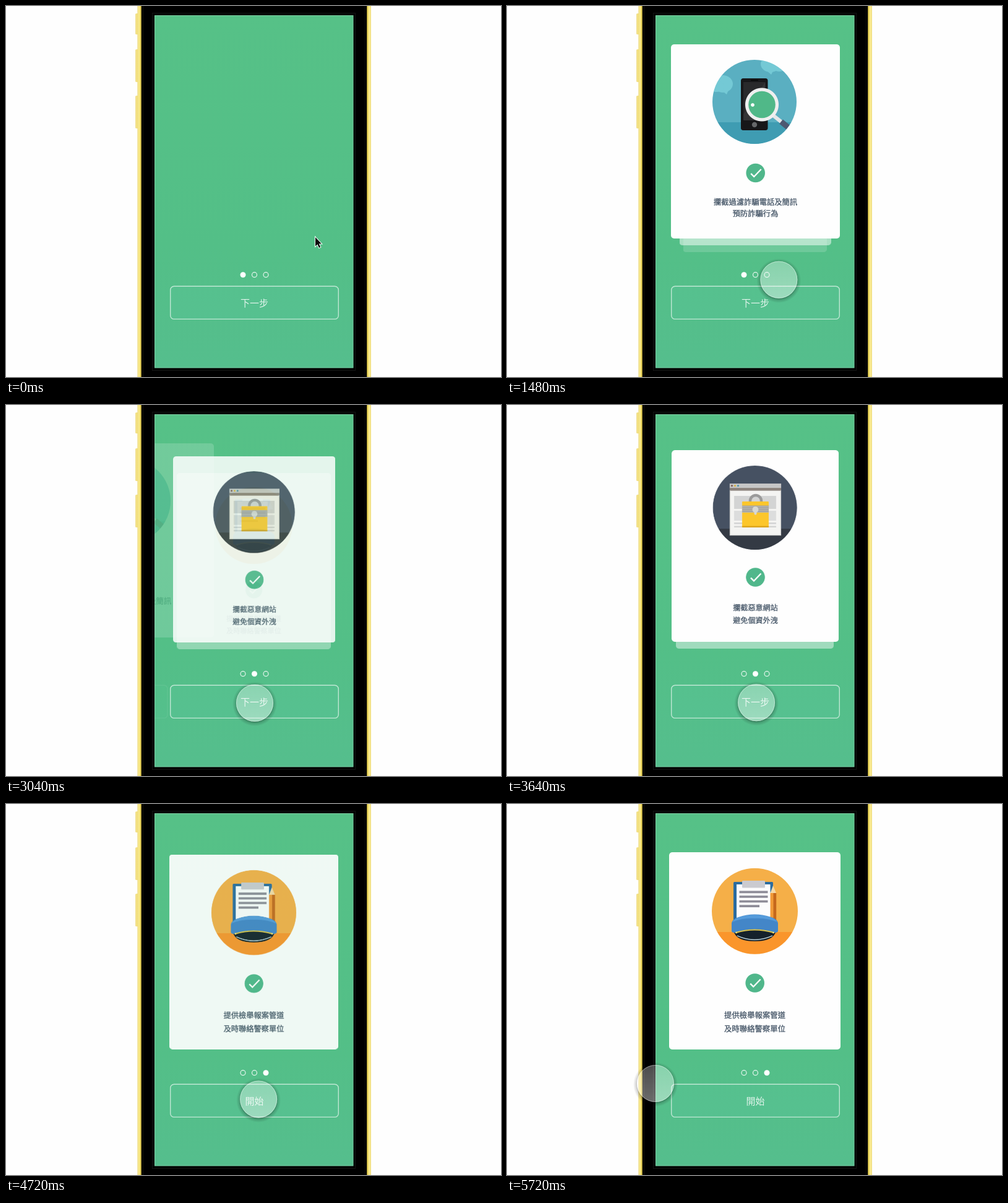
Animation of 800 by 600 pixels, one loop 5760 ms. Source, as an HTML page with a canvas:

```html
<!DOCTYPE html>
<html lang="zh-Hant">
<head>
<meta charset="utf-8">
<title>Onboarding cards</title>
<style>
html, body { margin: 0; width: 100%; height: 100%; overflow: hidden; background: #fefefe; }
canvas { display: block; width: 800px; height: 600px; }
</style>
</head>
<body>
<canvas id="stage" width="800" height="600"></canvas>
<script>
const LOOP = 5760;
const STEP_1 = 2885, STEP_2 = 4480;   // taps on the button
const TAU = 130;
const FONT = '"Noto Sans CJK TC", "Noto Sans CJK", "Noto Sans", sans-serif';
const main = document.getElementById('stage').getContext('2d');
let g = main;

const clamp = v => Math.max(0, Math.min(1, v));
const mix = (a, b, p) => a + (b - a) * p;
const settle = (t, start, tau) => t < start ? 0 : 1 - Math.exp((start - t) / tau);

function rect(x, y, w, h, fill, r = 0) {
  g.fillStyle = fill;
  g.beginPath();
  g.roundRect(x, y, w, h, r);
  g.fill();
}
function disc(x, y, r, fill, ry = r) {
  g.fillStyle = fill;
  g.beginPath();
  g.ellipse(x, y, r, ry, 0, 0, 7);
  g.fill();
}
function line(points, color, width, cap = 'butt') {
  g.strokeStyle = color;
  g.lineWidth = width;
  g.lineCap = cap;
  g.beginPath();
  points.forEach(([x, y], i) => i ? g.lineTo(x, y) : g.moveTo(x, y));
  g.stroke();
}
function shape(d, fill) {
  g.fillStyle = fill;
  g.fill(new Path2D(d));
}
function curve(d, color, width) {
  g.strokeStyle = color;
  g.lineWidth = width;
  g.lineCap = 'butt';
  g.stroke(new Path2D(d));
}
function label(text, x, y, size, fill, heavy) {
  g.font = `${size}px ${FONT}`;
  g.textAlign = 'center';
  g.textBaseline = 'alphabetic';
  g.fillStyle = g.strokeStyle = fill;
  g.fillText(text, x, y + size * 0.37);
  if (heavy) {
    g.lineWidth = 0.35;
    g.strokeText(text, x, y + size * 0.37);
  }
}
function scene(x, y, r, sky, ground, floorY, draw) {
  g.save();
  g.beginPath();
  g.arc(x, y, r, 0, 7);
  g.clip();
  rect(x - r, y - r, 2 * r, 2 * r, sky);
  rect(x - r, floorY, 2 * r, r, ground);
  draw();
  g.restore();
}
function check(x, y) {
  disc(x, y, 15.3, '#50b78b');
  line([[x - 7.5, y + 1], [x - 2.5, y + 6], [x + 9, y - 6]], '#fff', 2.3);
}

function phoneArt() {
  disc(349, 126, 16, '#74c9d5', 14);
  disc(338, 130, 13, '#74c9d5', 9);
  shape('M346 136L358 136L355 143Z', '#74c9d5');
  disc(426, 94, 16, '#74c9d5', 13);
  disc(440, 95, 13, '#74c9d5', 11);
  shape('M418 103L430 105L427 111Z', '#74c9d5');
  rect(378, 117, 43.5, 84, '#171719', 3.5);
  rect(382, 123, 35.5, 62, '#343436', 1);
  shape('M382 123H417.5L382 175Z', '#29292b');
  rect(394, 119.5, 12, 1.5, '#050505', 1);
  disc(400, 192, 4.2, '#66686a');
  line([[429, 176], [444, 188]], '#e4e6e8', 6);
  line([[443, 187], [462, 202.5]], '#4d5871', 9);
  disc(412, 159.5, 27, '#efefef');
  disc(412, 159.5, 21.8, '#50b888');
  disc(397, 160, 2.9, '#fff');
}
function siteArt() {
  rect(360, 127, 83, 84, '#f4f4f2');
  rect(360, 127, 83, 7, '#c6c6c6');
  rect(360, 134, 83, 4.5, '#8d837d');
  disc(363.5, 130.5, 1.5, '#7c5a50');
  disc(368.5, 130.5, 1.5, '#d8b23c');
  disc(373.5, 130.5, 1.5, '#4f93a8');
  rect(367, 147, 68, 21, '#d3d4d4');
  rect(367, 171, 68, 16, '#dcdddd');
  rect(367, 190, 68, 2.5, '#d3d4d4');
  rect(367, 195.5, 68, 2.5, '#d3d4d4');
  curve('M360.5 138V210.5H442.5V138', '#d0d0ce', 1.2);
  curve('M393 158V155A9 9 0 0 1 411 155V158', '#9a9a9a', 4.5);
  rect(380, 156, 43, 42, '#fcc62b', 1);
  rect(380, 162.5, 43, 11.5, '#a6a5a2');
  for (let y = 164; y < 174; y += 3) rect(380, y, 43, 1, '#b9b7b0');
  rect(380, 195.5, 43, 2.5, '#dda41e');
  disc(401.5, 169, 5, '#d8d8d4');
  rect(399.5, 171, 4, 6.5, '#d8d8d4', 2);
}
function reportArt() {
  rect(366, 126, 64, 75, '#2c6c9f', 2);
  rect(371, 130, 54.5, 70, '#fcfcfd');
  rect(380, 124, 37, 11.5, '#cacad0', 1);
  for (let i = 0; i < 4; i++) rect(375.5, 140.5 + i * 7.6, i < 3 ? 46 : 32.5, 3.7, '#8e8c98');
  shape('M425.5 144L430 132L435 144Z', '#f6d9a6');
  rect(425.5, 144, 5, 46, '#f19a37');
  rect(430.5, 144, 4.7, 46, '#c5681c');
  shape('M366 204Q400 192 435 204Q432 222 400.5 222Q369 222 366 204Z', '#14212b');
  shape('M363 193Q364 186 374 183Q400 174 427 183Q437 186 438 193V206Q434 210 429 207Q400 198 372 207Q366 210 363 206Z', '#4386c8');
  shape('M364 191Q370 180 400.5 179Q431 180 437 191Q420 184 400.5 185Q380 184 364 191Z', '#559bdb');
  curve('M370 208Q400 199 431 208', '#d9c24c', 2);
  curve('M372 213Q400 226 429 213', '#b9d2dc', 1.4);
  disc(370.5, 208, 1.4, '#f6e27a');
  disc(430.5, 208, 1.4, '#f6e27a');
}

// Each card is laid out in its settled place on the stage.
const cards = [
  { cx: 401.5, w: 273, h: 314, bottom: 376, draw() {
    scene(400, 155, 68, '#5aafc1', '#3f9cb2', 188, phoneArt);
    check(401.7, 270);
    label('攔截過濾詐騙電話及簡訊', 401.5, 317, 12.3, '#4a5a6b', true);
    label('預防詐騙行為', 401.5, 335.5, 12.3, '#4a5a6b', true);
  } },
  { cx: 401.2, w: 270, h: 310, bottom: 383, draw() {
    scene(400.7, 166, 68, '#465162', '#343a44', 200, siteArt);
    check(401.5, 278.5);
    label('攔截惡意網站', 401.5, 327.5, 12.1, '#4a5a6b', true);
    label('避免個資外洩', 401.5, 348, 12.1, '#4a5a6b', true);
  } },
  { cx: 400.5, w: 277, h: 319, bottom: 397, draw() {
    scene(400.5, 173.3, 69.5, '#f5af48', '#fa952b', 207, reportArt);
    check(400.7, 289.5);
    label('提供檢舉報案管道', 400.5, 341.5, 12.4, '#4a5a6b', true);
    label('及時聯絡警察單位', 400.5, 363.5, 12.4, '#4a5a6b', true);
  } }
];

// Paint every card once so it can fade as a whole.
for (const c of cards) {
  c.image = document.createElement('canvas');
  c.image.width = c.w * 2;
  c.image.height = c.h * 2;
  g = c.image.getContext('2d');
  g.scale(2, 2);
  g.translate(c.w / 2 - c.cx, c.h - c.bottom);
  rect(c.cx - c.w / 2, c.bottom - c.h, c.w, c.h, '#fefefe', 5);
  c.draw();
}
g = main;
g.imageSmoothingQuality = 'high';

function putCard(c, w, bottom, dx, alpha) {
  if (alpha <= 0 || dx > 330) return;
  const h = c.h * w / c.w;
  g.globalAlpha = clamp(alpha);
  g.drawImage(c.image, c.cx + dx - w / 2, bottom - h, w, h);
  g.globalAlpha = 1;
}

function drawCards(t, p, q) {
  const enter = i => t < 278 + i * 150 ? 400 : 320 * Math.exp((278 + i * 150 - t) / 95);
  const [a, b, c] = cards;
  putCard(c, mix(mix(232, 255, p), 277, q), mix(mix(398, 394, p), 397, q), enter(2),
    mix(mix(0.16, 0.45, p), 1, q));
  putCard(b, mix(245, 270, p), mix(387, 383, p), enter(1) - 290 * q,
    q > 0 ? 1 - 1.2 * q : mix(0.5, 1, p));
  putCard(a, 273, 376, enter(0) - 290 * p, 1 - 1.2 * p);
}

function button(text, dx, alpha) {
  g.save();
  g.globalAlpha = alpha;
  g.translate(dx, 0);
  g.beginPath();
  g.roundRect(265.7, 453.2, 271.6, 53.2, 6);
  g.fillStyle = 'rgba(90,195,152,.35)';
  g.fill();
  g.strokeStyle = 'rgba(255,255,255,.62)';
  g.lineWidth = 1.4;
  g.stroke();
  label(text, 401.5, 480, 15, 'rgba(255,255,255,.82)');
  g.restore();
}

function ghost(text, t, start) {
  const p = settle(t, start, 78);
  if (p > 0 && p < 0.99) button(text, -320 * p, 0.8 * (1 - p));
}

function controls(t) {
  const page = t < STEP_1 ? 0 : t < STEP_2 ? 1 : 2;
  [383, 401.5, 420].forEach((x, i) => {
    if (i === page) return disc(x, 434.7, 4.5, '#fff');
    g.beginPath();
    g.arc(x, 434.7, 4, 0, 7);
    g.strokeStyle = 'rgba(255,255,255,.85)';
    g.lineWidth = 1.2;
    g.stroke();
  });
  ghost('下一步', t, STEP_1);
  ghost('下一步', t, STEP_2);
  button(page < 2 ? '下一步' : '開始', 0, 1);
}

function strip(x, w, stops) {
  const fill = g.createLinearGradient(x, 0, x + w, 0);
  stops.forEach((c, i) => fill.addColorStop(i / (stops.length - 1), c));
  return fill;
}

function device() {
  rect(0, 0, 800, 600, '#fefefe');
  for (const [y, h] of [[12, 34], [70, 53], [145, 53]]) {
    rect(209.3, y, 6, h, strip(209, 6, ['#e6cf63', '#fbeb94', '#e9d060']), 1.5);
  }
  rect(212.5, 0, 7, 600, strip(212.5, 7, ['#e9d470', '#fcee96', '#f3dc5e', '#5e5218']));
  rect(582, 0, 8, 600, strip(582, 8, ['#5e5218', '#efd858', '#fcee96', '#eedb80']));
  rect(219, 0, 364, 600, '#000');
  g.strokeStyle = '#151515';
  g.lineWidth = 1;
  g.strokeRect(236.5, 11.5, 328, 578);
  line([[221.5, 0], [221.5, 600]], '#0e0e0e', 1);
  line([[580.5, 0], [580.5, 600]], '#0e0e0e', 1);
}

const PATH = [
  [0, 500, 379], [900, 500, 379], [1900, 402, 482], [3400, 402, 482],
  [4300, 408, 478], [4700, 408, 478], [5080, 427, 420], [5700, 240, 452], [LOOP, 240, 452]
];
function touchAt(t) {
  const i = PATH.findIndex(k => k[0] > t);
  const [t0, x0, y0] = PATH[i - 1], [t1, x1, y1] = PATH[i];
  const u = (t - t0) / (t1 - t0), s = u * u * (3 - 2 * u);
  return [mix(x0, x1, s), mix(y0, y1, s)];
}

function touch(x, y) {
  g.save();
  g.beginPath();
  g.rect(x - 50, y - 50, 100, 100);
  g.arc(x, y, 30, 0, 7);
  g.clip('evenodd');
  const shade = g.createRadialGradient(x, y + 1.5, 28, x, y + 1.5, 36);
  shade.addColorStop(0, 'rgba(0,0,0,.38)');
  shade.addColorStop(0.4, 'rgba(0,0,0,.16)');
  shade.addColorStop(1, 'rgba(0,0,0,0)');
  disc(x, y + 1.5, 36, shade);
  g.restore();
  const glass = g.createLinearGradient(0, y - 30, 0, y + 30);
  glass.addColorStop(0, 'rgba(255,255,255,.3)');
  glass.addColorStop(1, 'rgba(255,255,255,.42)');
  disc(x, y, 30, glass);
  g.beginPath();
  g.arc(x, y, 29.5, 0, 7);
  g.strokeStyle = 'rgba(255,255,255,.4)';
  g.lineWidth = 1;
  g.stroke();
}

function arrow() {
  const d = 'M500 374V388.5L503.4 385.4L506 391L508.2 390L505.7 384.6H509.8Z';
  curve(d, '#f4fff8', 2);
  shape(d, '#0a0a0a');
}

function draw(t) {
  const p = settle(t, STEP_1, TAU), q = settle(t, STEP_2, TAU);
  device();
  g.save();
  g.beginPath();
  g.rect(240, 15, 321.5, 570.5);
  g.clip();
  const back = g.createLinearGradient(0, 15, 0, 586);
  back.addColorStop(0, '#56c187');
  back.addColorStop(0.65, '#53bf87');
  back.addColorStop(1, '#55be8d');
  rect(240, 15, 322, 571, back);
  drawCards(t, p, q);
  controls(t);
  g.strokeStyle = 'rgba(190,235,210,.4)';
  g.lineWidth = 1;
  g.strokeRect(240.5, 15.5, 320.5, 569.5);
  g.restore();
  if (t < 120) arrow();
  else touch(...touchAt(t));
}

let begin;
function tick(now) {
  begin ??= now;
  draw(Math.max(0, now - begin) % LOOP);
  requestAnimationFrame(tick);
}
draw(0);
requestAnimationFrame(tick);
</script>
</body>
</html>
```
